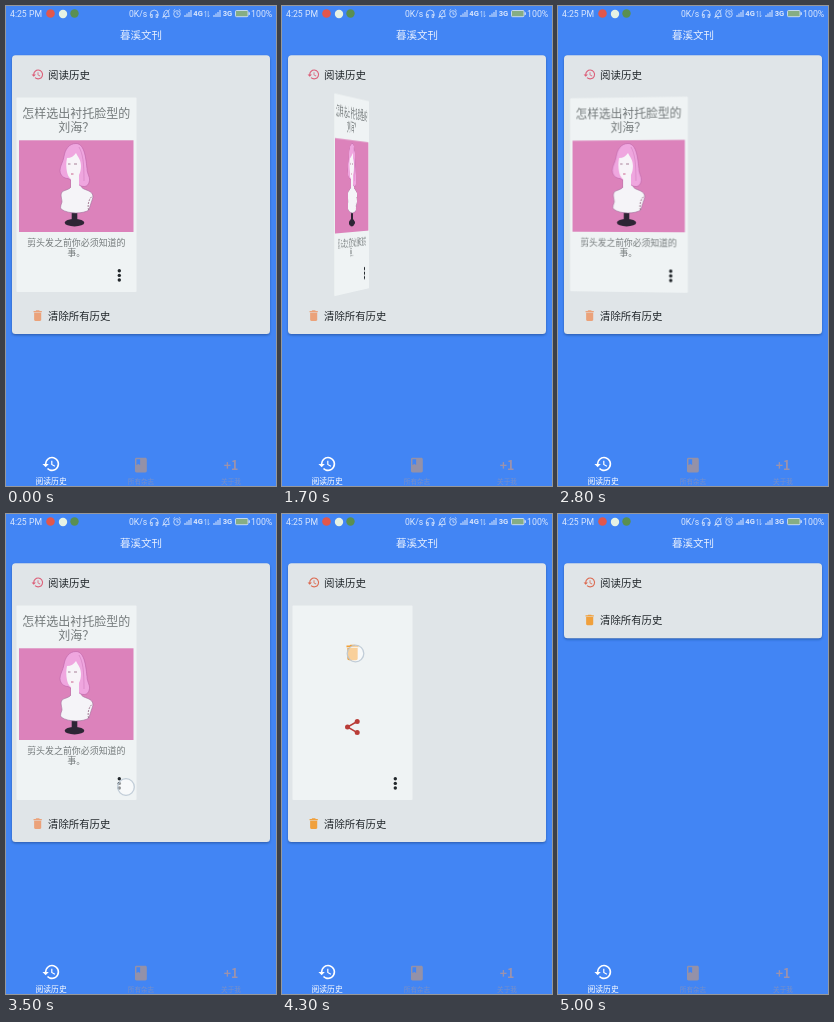
These frames come from a looping animation (270x480 px, 7.5 s). An HTML page:

```html
<!DOCTYPE html>
<html lang="zh-CN">
<head>
<meta charset="utf-8">
<title>阅读历史</title>
<style>
html, body { margin: 0; width: 100%; height: 100%; overflow: hidden; background: #4285f4; }
#stage { position: relative; width: 270px; height: 480px; max-height: 100%; overflow: hidden; contain: strict; }
svg { position: absolute; left: 0; top: 0; width: 270px; height: 480px; display: block; overflow: hidden; }
text { font-family: "Noto Sans CJK SC", "Noto Sans CJK", "Noto Sans", sans-serif; }
.bar text { font-family: Roboto, "Noto Sans", sans-serif; fill: #dbe7fd; }
.mid { text-anchor: middle; }
.face { transform-origin: 70.5px 188.5px; }
</style>
</head>
<body>
<div id="stage">
<svg viewBox="0 0 270 480">
  <defs>
    <path id="history" d="M13 3a9 9 0 0 0-9 9H1l3.9 3.9.1.1L9 12H6a7 7 0 1 1 2.06 4.94l-1.42 1.42A9 9 0 1 0 13 3zm-1 5v5l4.28 2.54.72-1.21-3.5-2.08V8z"/>
    <path id="trash" d="M6 19c0 1.1.9 2 2 2h8c1.1 0 2-.9 2-2V7H6zM19 4h-3.5l-1-1h-5l-1 1H5v2h14z"/>
    <path id="book" d="M18 2H6c-1.1 0-2 .9-2 2v16c0 1.1.9 2 2 2h12c1.1 0 2-.9 2-2V4c0-1.1-.9-2-2-2zM6 4h5v8l-2.5-1.5L6 12z"/>
    <path id="signal" d="M0 7h1V5H0zM2 7h1V3.5H2zM4 7h1V2H4zM6 7h1V0H6z"/>
    <g id="dots"><circle cx="113.3" cy="264.8" r="1.7"/><circle cx="113.3" cy="269.4" r="1.7"/><circle cx="113.3" cy="274" r="1.7"/></g>
    <rect id="sheet" x="10.5" y="91.5" width="120" height="194.5" rx="1" fill="#eff3f4"/>
    <filter id="soft" x="-10%" y="-10%" width="120%" height="120%"><feGaussianBlur stdDeviation="1"/></filter>
  </defs>

  <g class="bar">
    <text x="4" y="11.3" font-size="8.7">4:25 PM</text>
    <circle cx="44.5" cy="7.5" r="4.3" fill="#e2574c"/>
    <circle cx="57" cy="8" r="4.2" fill="#e6f2e4"/>
    <circle cx="68.5" cy="7.5" r="4.2" fill="#5a8f50"/>
    <text x="123" y="11.2" font-size="8.6">0K/s</text>
    <g fill="none" stroke="#dbe7fd" stroke-width=".8">
      <path d="M144.3 10V8a3.9 3.9 0 0 1 7.8 0v2M144.8 8.500v3h1.5v-3zM151.6 8.500v3h-1.5v-3z"/>
      <path d="M157 10.5c1-1 .5-5 2.5-6 2-.8 3.5 1 3.2 3.5l.6 2.5zM159 12h2M156.5 12l7-8.5"/>
      <circle cx="171" cy="8" r="3.3"/>
      <path d="M171 6v2.2h1.7M167.3 5l1.8-1.7M174.7 5l-1.8-1.7"/>
      <path d="M199.700 11V5l-1.3 1.5M202.2 5v6l1.3-1.5" stroke-width=".6"/>
    </g>
    <g fill="#dbe7fd"><use href="#signal" x="178.5" y="4"/><use href="#signal" x="207.5" y="4"/></g>
    <text x="187.3" y="10.4" font-size="7.6" font-weight="700">4G</text>
    <text x="216.7" y="10.4" font-size="7.6" font-weight="700">3G</text>
    <rect x="229.500" y="4.5" width="12.5" height="6.2" rx="1" fill="#86ad84" stroke="#dbe7fd" stroke-width=".8"/>
    <rect x="242.6" y="6.3" width="1.2" height="2.6" fill="#dbe7fd"/>
    <text x="245" y="11.2" font-size="8.8">100%</text>
  </g>
  <text class="mid" x="135" y="32.8" font-size="10.5" fill="#e9f0fe">暮溪文刊</text>

  <rect class="panel" x="6" y="50.5" width="258" height="278.700" rx="3.5" fill="#1c3f7c" opacity=".55" filter="url(#soft)"/>
  <rect class="panel" x="6" y="49.3" width="258" height="278.7" rx="3.5" fill="#e0e5e8"/>
  <use id="headIcon" href="#history" transform="translate(25 61.9) scale(.55)"/>
  <text x="42" y="72.5" font-size="10.5" fill="#20262a">阅读历史</text>
  <g id="clearRow">
    <use id="clearIcon" href="#trash" transform="translate(24.6 302.600) scale(.59)"/>
    <text x="42" y="313.8" font-size="10.4" fill="#20262a">清除所有历史</text>
  </g>

  <use href="#history" transform="translate(35.6 448.4) scale(.8)" fill="#fff"/>
  <text class="mid" x="45.1" y="478" font-size="7.8" fill="#fff">阅读历史</text>
  <use href="#book" transform="translate(126 450.2) scale(.74)" fill="#9491a8"/>
  <text class="mid" x="225" y="463.5" font-size="12.4" font-weight="700" fill="#9c92ac">+1</text>
  <g class="mid" fill="#7a8fc6" font-size="6.6">
    <text x="135" y="477.5">所有杂志</text>
    <text x="225" y="477.5">关于我</text>
  </g>
</svg>

<svg id="front" class="face" viewBox="0 0 270 480">
  <use href="#sheet"/>
  <g class="mid" fill="#747a7b" font-size="12">
    <text x="70.3" y="112">怎样选出衬托脸型的</text>
    <text x="70.3" y="126.3">刘海？</text>
  </g>
  <rect x="13" y="134.3" width="114.5" height="91.7" fill="#dc82bb"/>
  <!-- bust on its stand -->
  <ellipse cx="68.5" cy="216.7" rx="9.8" ry="3.7" fill="#2d2535"/>
  <path d="M65.7 205h5.6v11h-5.6z" fill="#2d2535"/>
  <path d="M65 170v11c-2 3-7 3-9 5-2 3 0 7 0 10-1 3-2 5-1 7 4 3 10 4 15 4 5 0 10-1 13-3 1-5 3-9 4-13 0-5-4-6-9-8-2-1-3-2-3-4v-9z" fill="#f5f4f8" stroke="#a0709a" stroke-width=".6"/>
  <path d="M82.500 204c-1-5 0-11 4-14" fill="none" stroke="#84506f" stroke-width=".7" stroke-dasharray="2 1"/>
  <path d="M70 137.5c-7 0-11 6-12 13-1 6-4 9-4 14 0 5 4 8 8 8l12 7c4 2 8 1 9-3 2-5-2-8-2-14-1-8-2-25-11-25z" fill="#efa6df" stroke="#bd63a8" stroke-width=".6"/>
  <path d="M65 168h8v14h-8z" fill="#f5f4f8"/>
  <path d="M61 152c4 0 7-2 9-5 2 4 5 7 5 13 0 7-3 12-7 15-3-1-6-4-7-9-1-5-1-9 0-14z" fill="#f7f4f8"/>
  <path d="M62 158h2.5M68 158h3" stroke="#84506f" stroke-width=".7"/>
  <path d="M65 168h2.5" stroke="#c4527f" stroke-width=".9"/>
  <path d="M73 141c4 7 5 16 5 34" fill="none" stroke="#cf7cbc" stroke-width=".6"/>
  <g class="mid" fill="#747a7b" font-size="8.95">
    <text x="70.3" y="239.7">剪头发之前你必须知道的</text>
    <text x="70.3" y="250.3">事。</text>
  </g>
  <use href="#dots" fill="#22272b"/>
</svg>

<svg id="back" class="face" viewBox="0 0 270 480">
  <use href="#sheet"/>
  <use href="#trash" transform="translate(60.2 128.1) scale(.86)" fill="#f3a035"/>
  <g fill="#b93c37">
    <path d="M75.2 207.5L65.5 213l9.7 5.6" fill="none" stroke="#b93c37" stroke-width="1.5"/>
    <circle cx="75.2" cy="207.5" r="2.5"/><circle cx="65.5" cy="213" r="2.5"/><circle cx="75.2" cy="218.6" r="2.5"/>
  </g>
  <use href="#dots" fill="#22272b"/>
</svg>

<svg viewBox="0 0 270 480">
  <circle id="touch" r="8.3" fill="#fff" fill-opacity=".5" stroke="#b9c6d2" stroke-opacity=".85" stroke-width="1.3"/>
</svg>
</div>

<script>
const $ = id => document.getElementById(id);
const LOOP = 7500, STEP = 100, FLIP = 500, HEIGHT = 278.7, SHRINK = 203.7;
const flips = [1480, 2380, 3580];
// start, end, x, y
const taps = [[1400, 1500, 116, 274], [2300, 2400, 116.5, 276], [3500, 3600, 120, 273], [4300, 4500, 73.5, 139.5]];
const panels = document.querySelectorAll('.panel');

const ramp = (t, a, b) => Math.min(1, Math.max(0, (t - a) / (b - a)));
const ease = p => (1 - Math.cos(Math.PI * p)) / 2;

function pose(t) {
  let side = 0, angle = 0;
  for (const start of flips) {
    if (t < start) break;
    const turn = 180 * ease(ramp(t, start, start + FLIP));
    if (turn < 90) angle = turn;
    else { side = 1 - side; angle = turn - 180; }
  }
  return { side, angle };
}

function draw(t) {
  const { side, angle } = pose(t);
  const alpha = 1 - ramp(t, 4400, 4600);
  [$('front'), $('back')].forEach((face, i) => {
    const shown = i === side && alpha > 0;
    face.style.display = shown ? 'block' : 'none';
    face.style.opacity = alpha;
    face.style.transform = Math.abs(angle) > 0.01 ? `perspective(1400px) rotateY(${angle}deg)` : 'none';
  });
  $('headIcon').setAttribute('fill', side ? '#dc6a50' : '#dc5f78');
  $('clearIcon').setAttribute('fill', side ? '#f0a03c' : '#eba27a');

  const lift = SHRINK * ease(ramp(t, 4800, 5000));
  panels.forEach(p => p.setAttribute('height', HEIGHT - lift));
  $('clearRow').setAttribute('transform', `translate(0 ${-lift})`);

  const tap = taps.find(([a, b]) => t >= a && t < b);
  $('touch').style.display = tap ? '' : 'none';
  if (tap) $('touch').setAttribute('transform', `translate(${tap[2]} ${tap[3]})`);
}

const begin = performance.now();
function tick() {
  const t = (performance.now() - begin) % LOOP;
  draw(Math.floor(t / STEP) * STEP);
  requestAnimationFrame(tick);
}
draw(0);
requestAnimationFrame(tick);
</script>
</body>
</html>
```
